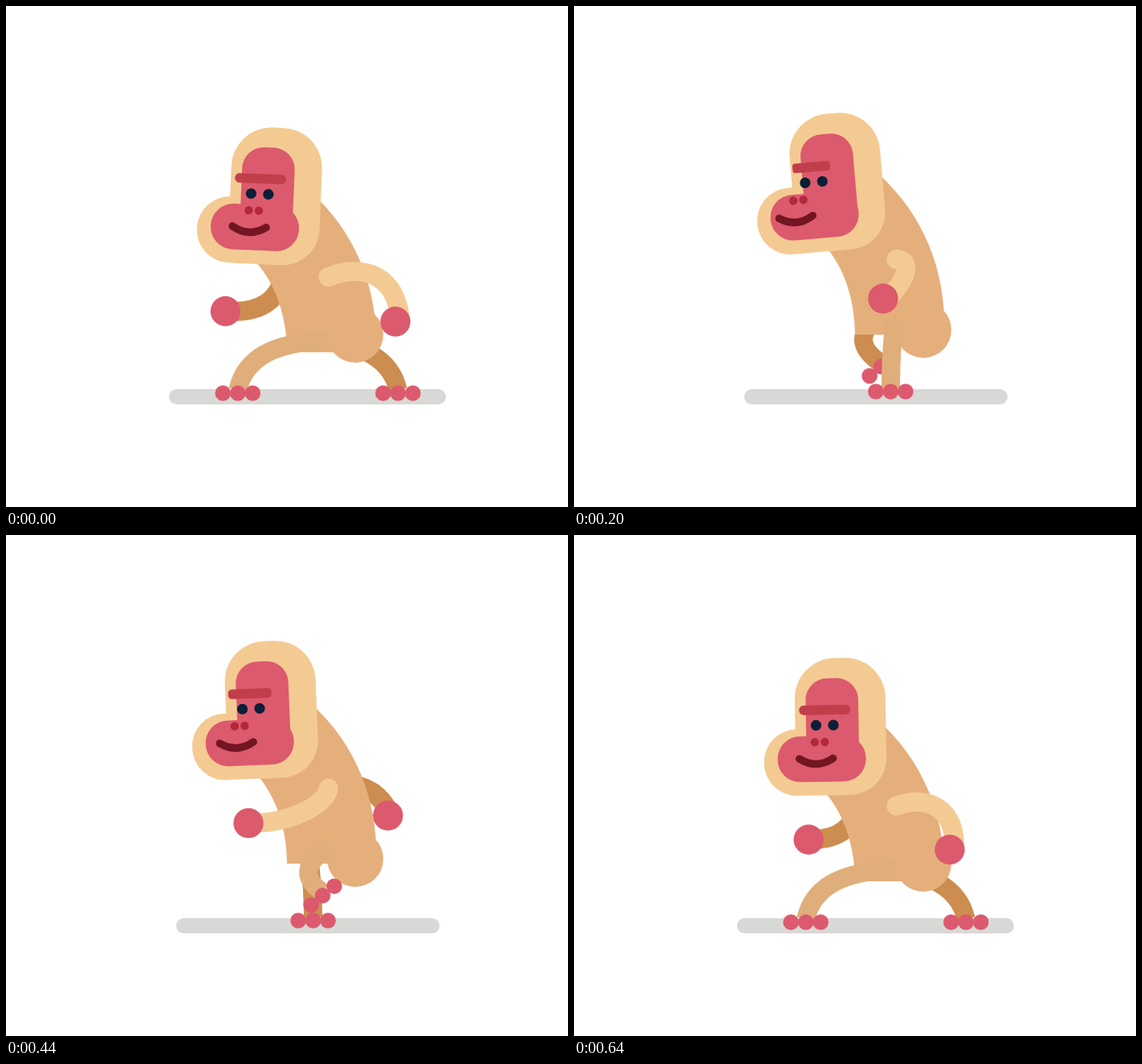
An HTML page with a canvas that plays this animation: 700 by 625 pixels, repeating every 680 ms.

```html
<!DOCTYPE html>
<html lang="en">
<head>
<meta charset="utf-8">
<title>Walking monkey</title>
<style>
  html, body { margin: 0; width: 100%; height: 100%; overflow: hidden; background: #fff; }
  canvas { display: block; }
</style>
</head>
<body>
<canvas id="stage" width="700" height="625"></canvas>
<script>
const ctx = document.getElementById('stage').getContext('2d');
const LOOP = 680, HALF = LOOP / 2, STEP = 40;
const SKIN = '#dc5a6d', FUR = '#f4ca93', BODY = '#e5af7c', LEG = '#e0ae7a', SHADE = '#cd8d50';

const wave = (t, peak, period = LOOP) => Math.cos(2 * Math.PI * (t - peak) / period);
const stepWave = t => wave(t, -20);
// Holds at full reach, then falls off quickly; larger power is sharper
const pulse = (c, power) => Math.sign(c) * Math.min(1, Math.abs(c / .983) ** power);

function circle(x, y, r, color) {
  ctx.fillStyle = color;
  ctx.beginPath();
  ctx.arc(x, y, r, 0, 7);
  ctx.fill();
}

function box(left, top, right, bottom, r, color) {
  ctx.fillStyle = color;
  ctx.beginPath();
  ctx.roundRect(left, top, right - left, bottom - top, r);
  ctx.fill();
}

function curve(x, y, points, width, color, cap = 'butt') {
  ctx.strokeStyle = color;
  ctx.lineWidth = width;
  ctx.lineCap = cap;
  ctx.beginPath();
  ctx.moveTo(x, y);
  if (points.length === 6) ctx.bezierCurveTo(...points);
  else ctx.quadraticCurveTo(...points);
  ctx.stroke();
}

function leg(t, hipX, low, color) {
  const c = stepWave(t);
  const x = 388.5 - 87 * pulse(c, 8) - 13 * c;
  // The foot is off the ground for 300 ms of each stride
  const swing = Math.min(1, Math.max(0, (t % LOOP - HALF) / 300));
  const lift = Math.max(0, Math.sin(Math.PI * swing));
  const y = 481 + 2 * low - 34 * lift ** .6;
  const tilt = -45 * lift;
  const kneeX = x + .12 * (hipX - x) + tilt;
  curve(hipX, 392 + 26 * low, [kneeX, 419, x, y - 4], 23, color);
  const a = tilt * Math.PI / 180;
  for (const d of [-18.5, 0, 18.5]) circle(x + d * Math.cos(a), y + d * Math.sin(a), 9.8, SKIN);
}

function nearArm(t, y) {
  const s = wave(t, 30), handX = 385 + 104 * s, handY = y + 49 + 7 * s;
  const x = 401.5;
  curve(x, y, [x + 19 + 24 * s, y + 2 - 20 * s, x + 15 + 74 * s, y + 22 - 26 * s, handX + 6, handY], 24, FUR, 'round');
  circle(handX, handY, 18.7, SKIN);
}

function farArm(t, y) {
  const s = wave(t, 30), handX = 384 + 115 * s, handY = y + 38 - 5 * s;
  curve(385 + 40 * s, y - 5, [405 + 70 * s, y + 17 - 30 * s, handX + 4, handY], 24, SHADE);
  circle(handX, handY, 18.7, SKIN);
}

function torso(drop, hipY) {
  ctx.fillStyle = BODY;
  ctx.fill(new Path2D(`M320 ${200 + drop}h48c62 50 90 118 93 185v25h-111c0-40-12-88-46-120z`));
  circle(435, hipY, 35, BODY);
}

function head(t, drop) {
  const angle = -1.9 + 4 * wave(t, 22, HALF) + wave(t, 22, HALF / 2);
  const turn = Math.max(0, .45 + .55 * wave(t, 280));
  const slide = -9 * turn, eye = -11 * turn, mouth = -28 * turn;
  ctx.save();
  ctx.translate(362, 278 + drop);
  ctx.rotate(angle * Math.PI / 180);
  ctx.translate(-362, -300);
  box(276.5, 153, 389.5, 324, [50, 50, 46, 46], FUR);
  box(237 + slide, 241, 380 + slide, 324, 41, FUR);
  box(290, 178, 355.5, 306, [27, 27, 28, 28], SKIN);
  box(254 + slide, 250, 364 + slide, 307, 28, SKIN);
  box(281.5 - 3 * turn, 211.5, 345.5 - 23 * turn, 223.5, 6 - 3 * turn, '#c13f4a');
  for (const x of [302.5, 324]) circle(x + eye, 236.5, 6.6, '#0c1f38');
  for (const x of [300.5, 313]) circle(x + mouth, 257.5, 5.2, '#b3283b');
  curve(281 + mouth, 278, [302 + mouth, 291.5, 323 + mouth, 278], 9.5, '#731522', 'round');
  ctx.restore();
}

function draw(now) {
  const t = Math.floor(now / STEP) * STEP % LOOP;
  const low = pulse(Math.abs(stepWave(t)), 12), drop = 22 * low;
  ctx.clearRect(0, 0, 700, 625);
  box(212 - 9 * low, 478, 540 + 8 * low, 497, 9.5, '#d8d9d6');
  farArm(t + HALF, 316 + drop);
  leg(t + HALF, 375, low, SHADE);
  torso(drop, 404 + 6 * low);
  leg(t, 400, low, LEG);
  nearArm(t, 316 + drop);
  head(t, drop);
}

const start = performance.now();
function tick() {
  draw(performance.now() - start);
  requestAnimationFrame(tick);
}
tick();
</script>
</body>
</html>
```
